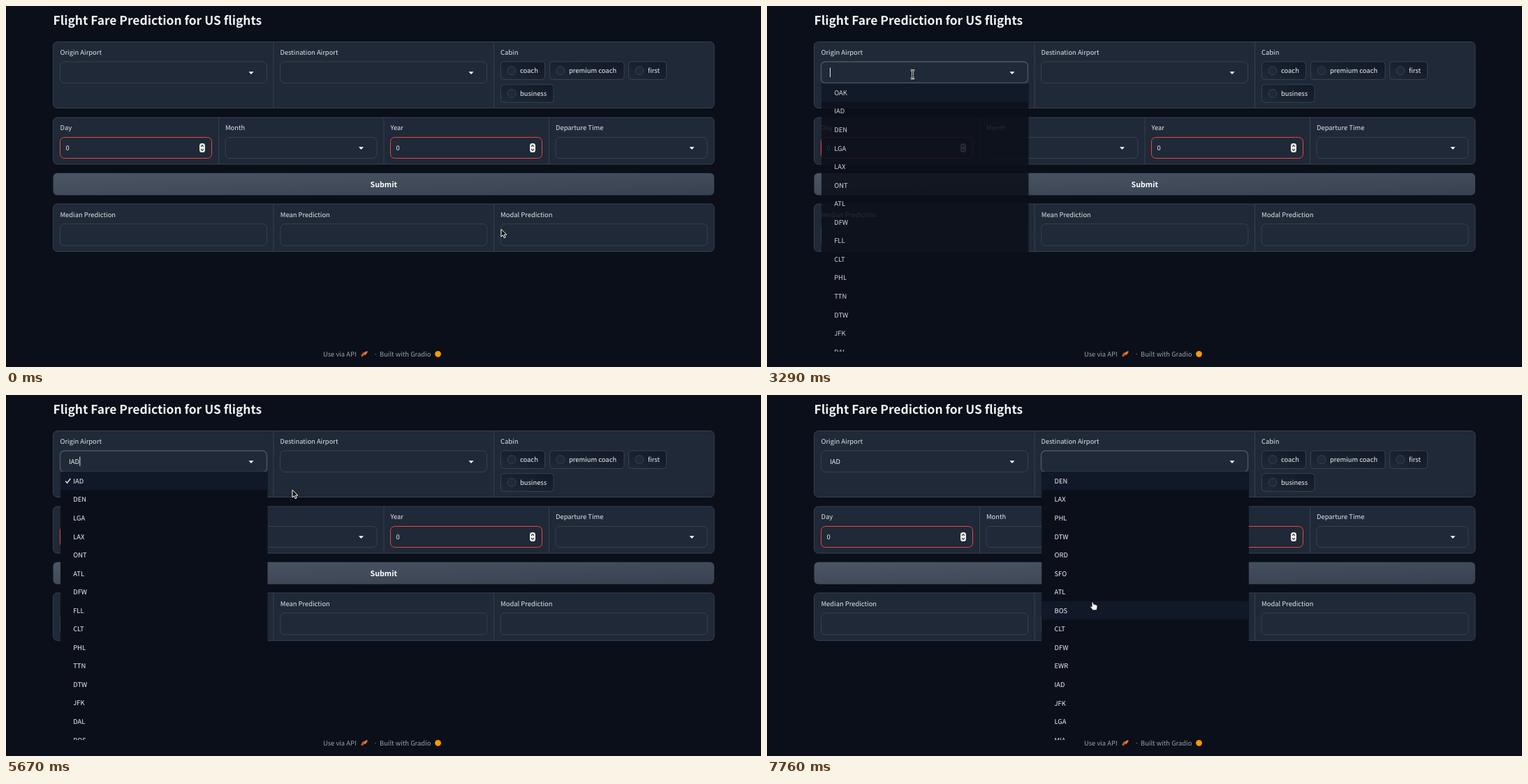
An HTML page that plays this animation: 1081x518 px, repeating every 8000 ms.

```html
<!DOCTYPE html>
<html lang="en">
<head>
<meta charset="utf-8">
<title>Flight fare form</title>
<style>
html, body { margin: 0; width: 100%; height: 100%; overflow: hidden; background: #0b0f19; }
svg { display: block; width: 100vw; height: 100vh; }
text {
  font: 400 9.4px "Noto Sans CJK JP", "Noto Sans CJK SC", "Noto Sans CJK", "Noto Sans", sans-serif;
  fill: #e5e7eb; text-rendering: geometricPrecision; white-space: pre;
}
.title { font-size: 17.4px; font-weight: 700; fill: #f3f4f6; }
.submit { font-size: 10.7px; font-weight: 700; fill: #fff; text-anchor: middle; }
.value, .option { font-weight: 500; fill: #f3f4f6; }
.foot { fill: #9ca3af; }
</style>
</head>
<body>
<svg id="stage" viewBox="0 0 1081 518">
  <defs>
    <linearGradient id="submitFill" x2="1" y2="1">
      <stop stop-color="#4b5563"/><stop offset="1" stop-color="#374151"/>
    </linearGradient>
    <linearGradient id="radioFill" y1="1" x2="1" y2="0">
      <stop stop-color="#1f2937"/><stop offset="1" stop-color="#111827"/>
    </linearGradient>
    <clipPath id="listClip"><rect x="0" y="110" width="1081" height="385"/></clipPath>
  </defs>
</svg>
<script>
const LOOP = 8000, ROW = 26.55, TOP = 110;
const stage = document.getElementById('stage');

function el(tag, attrs, parent = stage, content) {
  const node = document.createElementNS('http://www.w3.org/2000/svg', tag);
  set(node, attrs);
  if (content !== undefined) node.textContent = content;
  return parent.appendChild(node);
}
function set(node, attrs) {
  for (const k in attrs) node.setAttribute(k, attrs[k]);
}
const label = (x, y, s, cls = '', parent = stage) => el('text', { x, y, class: cls }, parent, s);
const box = (x, y, width, height, rx, fill, stroke, parent) =>
  el('rect', { x, y, width, height, rx, fill, stroke }, parent);
const field = (x, y, w, h, stroke = '#374151') => box(x, y, w, h, 6, '#1f2937', stroke);
const arrow = (x, y) => el('path', { d: `M${x - 3.5} ${y - 1.7}h7l-3.5 3.6z`, fill: '#fff' });

function panel(y, h, dividers) {
  box(67.5, y, 946.5, h, 6, '#1f2937', '#374151');
  dividers.forEach(x => el('path', { d: `M${x} ${y}v${h}`, stroke: '#374151' }));
}
function numberField(x) {
  field(x, 188.5, 217, 30, '#ef4444');
  label(x + 8, 207.2, '0', 'value');
  box(x + 199.5, 197, 8, 13, 3.6, '#f1f1f1', 'none');
  el('path', {
    d: `M${x + 201.5} 201.8l2-2.2 2 2.2m-4 3.4l2 2.2 2-2.2`,
    fill: 'none', stroke: '#333', 'stroke-width': 1.2
  });
}
function radio(x, y, w, name) {
  box(x, y, w, 25.5, 4, 'url(#radioFill)', '#374151');
  el('circle', { cx: x + 15.5, cy: y + 12.7, r: 6, fill: '#1f2937', stroke: '#374151' });
  label(x + 27.5, y + 16.3, name, 'value');
}

// Static page
label(67.5, 27.3, 'Flight Fare Prediction for US flights', 'title');

panel(51.5, 95, [383, 698.5]);
label(77.5, 69.8, 'Origin Airport');
label(392.5, 69.8, 'Destination Airport');
label(708, 69.8, 'Cabin');
const origin = field(77.5, 80, 296, 30.5);
const dest = field(392.5, 80, 296, 30.5);
arrow(351, 96);
arrow(666, 96);
radio(708.5, 80, 63, 'coach');
radio(778.5, 80, 106.5, 'premium coach');
radio(891.5, 80, 54, 'first');
radio(708.5, 112.8, 75.5, 'business');

panel(160, 67, [304.5, 541, 777.5]);
['Day', 'Month', 'Year', 'Departure Time'].forEach((s, i) => label(77.5 + i * 236.5, 178.3, s));
numberField(77.5);
numberField(550.5);
field(314, 188.5, 217, 30);
field(787, 188.5, 217, 30);
arrow(508.5, 204);
arrow(982, 204);

box(67.5, 239.7, 946.5, 31.8, 6, 'url(#submitFill)', 'none');
label(540.7, 260, 'Submit', 'submit');

panel(284, 68.3, [383, 698.5]);
['Median', 'Mean', 'Modal'].forEach((s, i) => {
  const x = 77.5 + i * 315.3;
  label(x, 302.7, s + ' Prediction');
  field(x, 312.7, 296, 31.3);
});

label(454, 502.8, 'Use via API', 'foot');
el('path', { d: 'M508 502l3-5 3 3-4 3.5z', fill: '#b45a28' });
el('path', { d: 'M511.5 498l4-2.6 2.2-.2-.4 2.4-3 3.6z', fill: '#e8762d' });
label(526.5, 502.8, '·', 'foot');
label(535, 502.8, 'Built with Gradio', 'foot');
el('circle', { cx: 618.5, cy: 499.3, r: 4.4, fill: '#f99a00' });

// Typed value and caret
const typed = label(90, 98.7, 'IAD', 'value');
const caret = el('path', { d: 'M0 88.5v13.5', stroke: '#e5e7eb' });

// Option lists
function optionList(x, names) {
  const g = el('g', {});
  const inner = el('g', { 'clip-path': 'url(#listClip)' }, g);
  box(x, TOP, 296.5, 385, 0, '#0b0f19', 'none', inner);
  const marks = [0, 1].map(() => box(x, TOP, 296.5, ROW, 0, '#111827', 'none', inner));
  const rows = el('g', {}, inner);
  names.split(' ').forEach((s, i) => label(x + 18.2, TOP + 16.9 + i * ROW, s, 'option', rows));
  return { g, marks, rows, inner };
}
const from = optionList(78, 'OAK IAD DEN LGA LAX ONT ATL DFW FLL CLT PHL TTN DTW JFK DAL BOS');
const to = optionList(393.3, 'DEN LAX PHL DTW ORD SFO ATL BOS CLT DFW EWR IAD JFK LGA MIA');
const tick = el('path', {
  d: 'M85.2 123.4l2.3 2.8 4.8-6.2', fill: 'none', stroke: '#f3f4f6', 'stroke-width': 1.3
}, from.inner);
const bar = box(367.5, 130.5, 6, 278, 3, '#0d111b', '#4b5563', from.inner);

// Pointers, drawn around their hot spot
const ink = { stroke: '#fff', 'stroke-width': 1, 'stroke-linejoin': 'round', fill: '#0a0a0a' };
const pointers = {
  arrow: el('path', { ...ink, d: 'M0 .3V11l2.5-2.3 1.7 4 1.9-.8-1.7-3.9h3.5z' }),
  beam: el('g', {}),
  hand: el('path', {
    d: 'M-2.4-5.5c1-.8 1.7 0 2 1l.6 2c1-.5 1.6 0 1.8.5 1-.4 1.6 0 1.8.6 1.2-.3 1.6.4 1.6 1.6 0 2.2-.6 3-1 5.5h-5.6c-.8-1.8-2.6-3-3.3-4.6-.2-1.2 1-1.2 2.2 0z',
    fill: '#fff', stroke: '#111', 'stroke-width': .7
  })
};
const beam = 'M-2.8-6Q0-6 0-4.4Q0-6 2.8-6M0-4.6V4.6M-2.8 6Q0 6 0 4.4Q0 6 2.8 6M-1.6 2h3.2';
[['#fff', 2.4], ['#111', 1]].forEach(([stroke, w]) =>
  el('path', { d: beam, fill: 'none', stroke, 'stroke-width': w }, pointers.beam));

// Held keys: time, x, y, pointer
const moves = [
  [0, 709, 320, 'arrow'], [300, 570, 282, 'arrow'], [450, 432, 237, 'arrow'],
  [1500, 310, 150, 'arrow'], [1650, 234, 95, 'arrow'], [1950, 219, 96, 'arrow'],
  [2100, 208, 97, 'arrow'], [3290, 208.5, 98, 'beam'],
  [3730, 186, 130, 'hand'], [3880, 160, 152, 'hand'], [4030, 153, 156, 'hand'],
  [5220, 162, 156, 'hand'], [5370, 205, 152, 'hand'], [5520, 300, 144, 'hand'],
  [5670, 410, 136, 'arrow'], [5820, 490, 130, 'arrow'], [5970, 526, 126, 'arrow'],
  [6110, 518, 123, 'arrow'], [6260, 507, 120, 'arrow'], [6410, 505, 112, 'arrow'],
  [6560, 504, 105, 'beam'], [6710, 503.5, 103, 'beam'], [6860, 503.5, 102, 'beam'],
  [7460, 497, 165, 'hand'], [7610, 475, 270, 'hand'], [7760, 467.5, 303, 'hand']
];
// Held keys: time, opacity, vertical shift
const fromFade = [[0, 0, 0], [3290, .87, 1], [3440, 1, 0], [7160, .14, 3], [7310, 0, 0]];
const toFade = [[0, 0, 0], [7160, .87, .8], [7310, 1, 0]];
const barFade = [[0, 0], [4330, .5], [4480, 1], [5220, .5], [5370, 0]];
const blink = [[0, 0], [3290, 1], [3730, 0], [4330, 1], [4930, 0], [5370, 1],
  [5970, 0], [6410, 1], [6860, 0], [7160, 1], [7610, 0]];

const held = (keys, t) => keys.filter(k => k[0] <= t).pop();
const focus = (node, on) => set(node, { stroke: on ? '#4b5563' : '#374151', 'stroke-width': on ? 1.5 : 1 });

function showList(list, fade, t, rows) {
  const [, opacity, dy] = held(fade, t);
  set(list.g, { opacity, transform: `translate(0 ${dy})` });
  list.marks.forEach((m, i) => set(m, {
    y: TOP + (rows[i] || 0) * ROW, opacity: rows[i] === undefined ? 0 : 1
  }));
}

function draw(t) {
  const [, x, y, kind] = held(moves, t);
  for (const k in pointers) {
    set(pointers[k], { transform: `translate(${x} ${y})`, visibility: k === kind ? 'visible' : 'hidden' });
  }
  const picked = t >= 4330, second = t >= 7160;
  const hover = kind === 'hand' ? Math.floor((y - 3 - TOP) / ROW) : undefined;

  focus(origin, t >= 3290 && !second);
  focus(dest, second);
  set(typed, { opacity: +picked });
  set(caret, {
    opacity: held(blink, t)[1],
    transform: `translate(${second ? 406 : picked ? 105.8 : 90.5} 0)`
  });

  showList(from, fromFade, t, second ? [] : [hover ?? 0]);
  showList(to, toFade, t, [0, hover]);
  set(from.rows, { transform: `translate(0 ${picked ? -ROW : 0})` });
  set(tick, { opacity: +picked });
  set(bar, { opacity: held(barFade, t)[1] });
}

const start = performance.now();
function loop() {
  draw((performance.now() - start) % LOOP);
  requestAnimationFrame(loop);
}
draw(0);
requestAnimationFrame(loop);
</script>
</body>
</html>
```
